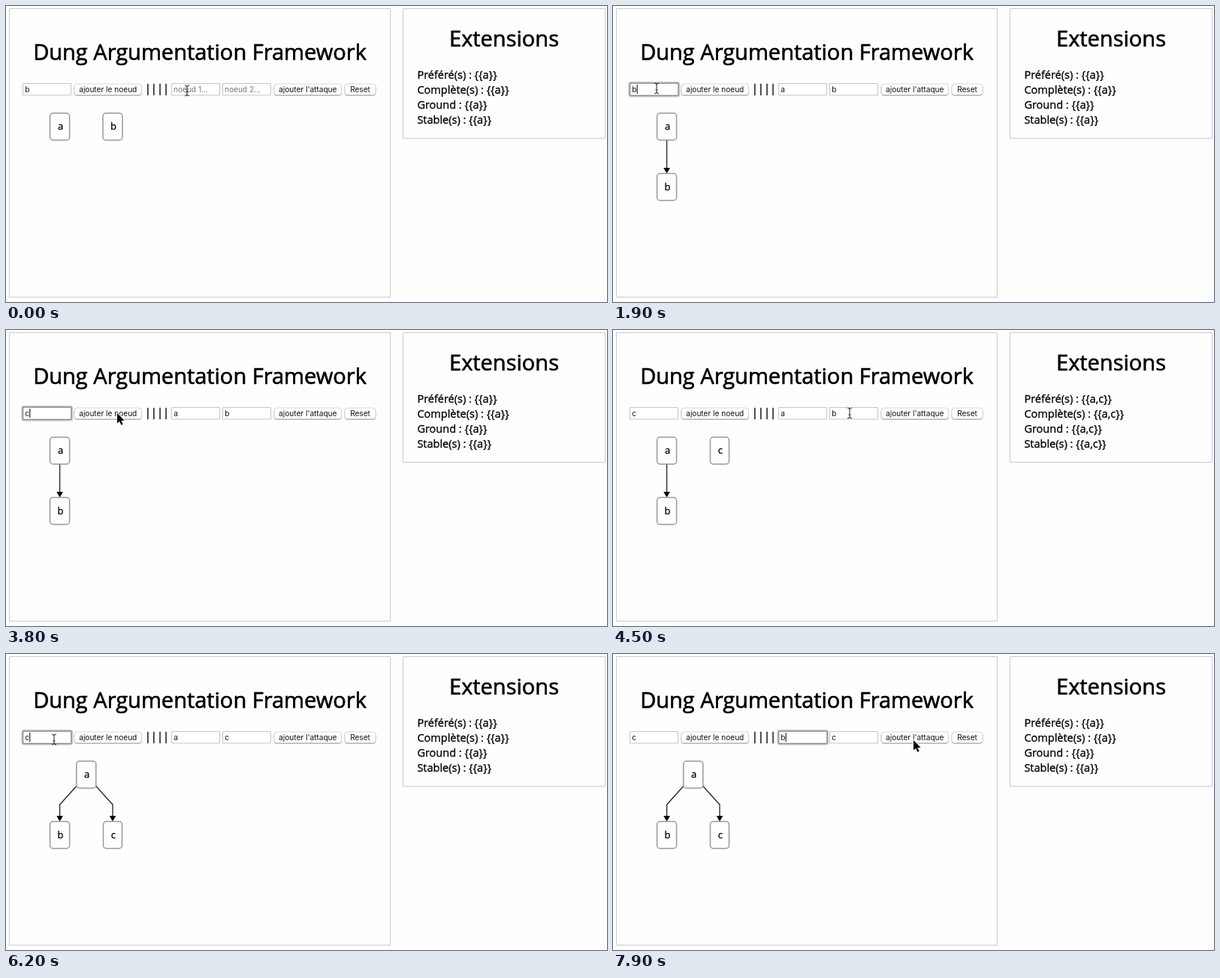
An HTML page with a canvas that plays this animation: 800x395 px, repeating every 8 s.

```html
<!DOCTYPE html>
<html lang="fr">
<head>
<meta charset="utf-8">
<title>Argumentation</title>
<style>
html, body { margin: 0; width: 100%; height: 100%; overflow: hidden; background: #fefefe; }
canvas { display: block; }
</style>
</head>
<body>
<canvas id="stage" width="800" height="395"></canvas>
<script>
const ctx = document.getElementById('stage').getContext('2d');
const LOOP = 8000, STEP = 100;
const PAGE = '"Open Sans", "Noto Sans", sans-serif';
const UI = '10.1px Inter, Roboto, sans-serif';
const FIELDS = [22.5, 220.5, 288.5];
const HINTS = ['', 'noeud 1...', 'noeud 2...'];

// Node cells are [column, row]; edges are pairs of names.
const GRAPHS = {
  pair: { nodes: { a: [0, 0], b: [1, 0] }, edges: [] },
  chain: { nodes: { a: [0, 0], b: [0, 1] }, edges: ['ab'] },
  loose: { nodes: { a: [0, 0], b: [0, 1], c: [1, 0] }, edges: ['ab'] },
  fork: { nodes: { a: [0.5, 0], b: [0, 1], c: [1, 1] }, edges: ['ab', 'ac'] }
};

const events = [], moves = [];
const at = (t, change) => events.push({ t, change });
const move = (t, x, y) => moves.push({ t, x, y });
const focus = (t, i) => at(t, { focus: i, sel: false });

function fill(t, i, letter) {
  at(t, { focus: i, ['v' + i]: '' });
  at(t + 300, { ['v' + i]: letter });
}

function swap(t, i, letter) {
  at(t, { focus: i, sel: true });
  at(t + 200, { ['v' + i]: letter, sel: false });
}

function submit(t, graph, ext) {
  at(t, { focus: -1, graph });
  at(t + 200, { ext });
}

at(0, { v0: 'b', v1: '', v2: '', focus: -1, sel: false, ext: 'a', graph: 'pair' });
move(0, 241, 113);
at(100, { ext: 'a,b' });
fill(100, 1, 'a');
fill(500, 2, 'b');
move(600, 414, 106);
submit(1200, 'chain', 'a');

move(1500, 58, 110);
focus(1800, 0);
fill(2300, 0, 'a');
move(2600, 50, 120);
move(3100, -3, 107);
swap(3300, 0, 'c');
move(3500, 148, 111);
submit(3900, 'loose', 'a,c');

move(4100, 315, 111);
move(4600, 275, 98);
swap(4700, 2, 'c');
move(4900, 404, 112);
submit(5300, 'fork', 'a');

move(5600, 64, 114);
focus(6200, 0);
move(6600, 241, 112);
focus(7000, 1);
swap(7300, 1, 'b');
move(7500, 400, 115);

events.sort((p, q) => p.t - q.t);

function stateAt(t) {
  const s = {};
  for (const e of events) {
    if (e.t <= t) Object.assign(s, e.change, { since: e.t });
  }
  return s;
}

// Longer trips take longer.
function pointerAt(t) {
  let { x, y } = moves[0];
  for (const m of moves) {
    if (m.t > t) break;
    const time = 60 + 0.9 * Math.hypot(m.x - x, m.y - y);
    const k = Math.min(1, (t - m.t) / time);
    const e = k * k * (3 - 2 * k);
    x += (m.x - x) * e;
    y += (m.y - y) * e;
  }
  return [x, y];
}

function text(str, x, y, font, color = '#111', align = 'left') {
  ctx.font = font;
  ctx.fillStyle = color;
  ctx.textAlign = align;
  ctx.fillText(str, x, y);
}

// Page text is smoothed a little heavier than the regular weight.
function pageText(str, x, y, size, align) {
  text(str, x, y, `${size}px ${PAGE}`, '#000', align);
  ctx.strokeStyle = '#000';
  ctx.lineWidth = size * 0.022;
  ctx.lineJoin = 'round';
  ctx.strokeText(str, x, y);
}

function box(x, y, w, h, r, stroke, width = 1, fill) {
  ctx.beginPath();
  ctx.roundRect(x, y, w, h, r);
  if (fill) { ctx.fillStyle = fill; ctx.fill(); }
  ctx.strokeStyle = stroke;
  ctx.lineWidth = width;
  ctx.stroke();
}

function poly(points, close) {
  ctx.beginPath();
  points.forEach(([x, y]) => ctx.lineTo(x, y));
  if (close) ctx.closePath();
}

function button(label, x, w) {
  box(x, 104.5, w, 15, 3.5, '#b4b4b4', 1, '#b4b4b4');
  box(x, 104, w, 14.6, 3.5, '#d0d0d0', 0.8, '#fff');
  text(label, x + w / 2, 115.2, UI, '#111', 'center');
}

function field(i, s, t) {
  const x = FIELDS[i], value = s['v' + i], focused = s.focus === i;
  if (focused) {
    box(x - 0.5, 102.5, 65.5, 17.5, 2, 'rgba(120,120,120,.35)', 3.5);
    box(x, 103, 64.5, 16.5, 1, '#8c8c8c', 1.5, '#fff');
  } else {
    box(x, 103.5, 64, 15.5, 0, '#c6c6c6', 1, '#fff');
  }
  ctx.font = UI;
  const w = ctx.measureText(value).width;
  if (focused && s.sel) {
    ctx.fillStyle = '#c4c4c4';
    ctx.fillRect(x + 2.5, 105, w + 0.5, 12);
  }
  if (value) text(value, x + 2.8, 115, UI);
  else if (HINTS[i] && !focused) text(HINTS[i], x + 2.5, 115, UI, '#777');
  const lit = Math.floor((t - s.since) / 500) % 2 === 0;
  if (focused && !s.sel && lit) {
    ctx.fillStyle = '#000';
    ctx.fillRect(x + 3 + w, 105, 1, 12);
  }
}

const place = ([col, row]) => [71.6 + 70.4 * col, 143 + 80.5 * row];

function node(label, cell) {
  const [x, y] = place(cell);
  const w = label === 'c' ? 25 : 26;
  box(x - w / 2, y, w, 36, 4, '#999', 1.5, '#fff');
  pageText(label, x + 0.9, y + 22, 13, 'center');
}

function edge(from, to) {
  const [x0, y0] = place(from), [x, y] = place(to);
  const side = Math.sign(x - x0);
  const tip = y - 7.5;
  poly([[x0 + 12.7 * side, y0 + 36 - 3 * Math.abs(side)], [x, y - 22.5], [x, tip]]);
  ctx.strokeStyle = '#222';
  ctx.lineWidth = 1.3;
  ctx.stroke();
  poly([[x - 4.3, tip], [x + 4.3, tip], [x, y]], true);
  ctx.fillStyle = '#000';
  ctx.fill();
}

function graph({ nodes, edges }) {
  edges.forEach(([from, to]) => edge(nodes[from], nodes[to]));
  Object.entries(nodes).forEach(([label, cell]) => node(label, cell));
}

function ibeam() {
  ctx.beginPath();
  for (const d of [-1, 1]) {
    ctx.moveTo(-3, 7 * d);
    ctx.quadraticCurveTo(0, 7 * d, 0, 5 * d);
    ctx.quadraticCurveTo(0, 7 * d, 3, 7 * d);
  }
  ctx.moveTo(0, -6);
  ctx.lineTo(0, 6);
  ctx.moveTo(-1.5, 2);
  ctx.lineTo(1.5, 2);
  ctx.strokeStyle = '#222';
  ctx.lineWidth = 1;
  ctx.stroke();
}

function arrow() {
  poly([[0, 0], [0, 13.5], [3.1, 10.8], [5.3, 15.8], [7.6, 14.8], [5.4, 9.9], [9.6, 9.7]], true);
  ctx.strokeStyle = '#fff';
  ctx.lineWidth = 1.8;
  ctx.stroke();
  ctx.fillStyle = '#000';
  ctx.fill();
}

function pointer(t) {
  const [x, y] = pointerAt(t);
  const overField = y > 103 && y < 120 && FIELDS.some(f => x > f && x < f + 64);
  ctx.save();
  ctx.translate(x, y);
  overField ? ibeam() : arrow();
  ctx.restore();
}

function draw(t) {
  const s = stateAt(t);
  ctx.fillStyle = '#fefefe';
  ctx.fillRect(0, 0, 800, 395);
  box(4.5, 3.5, 507, 385, 0, '#cbcbd0');
  box(528.5, 3.5, 269, 173, 0, '#cbcbd0');

  pageText('Dung Argumentation Framework', 258, 72, 29, 'center');
  pageText('Extensions', 663, 53.5, 29, 'center');
  ['Préféré(s)', 'Complète(s)', 'Ground', 'Stable(s)'].forEach((name, i) =>
    pageText(`${name} : {{${s.ext}}}`, 547.4, 96.5 + 20 * i, 14.5));

  FIELDS.forEach((_, i) => field(i, s, t));
  button('ajouter le noeud', 91, 89.5);
  pageText('||||', 184.8, 115, 14.6);
  button("ajouter l'attaque", 357, 89.5);
  button('Reset', 451, 41);

  graph(GRAPHS[s.graph]);
  pointer(t);
}

function tick() {
  const t = performance.now() % LOOP;
  draw(Math.floor(t / STEP) * STEP);
  requestAnimationFrame(tick);
}
tick();
</script>
</body>
</html>
```
